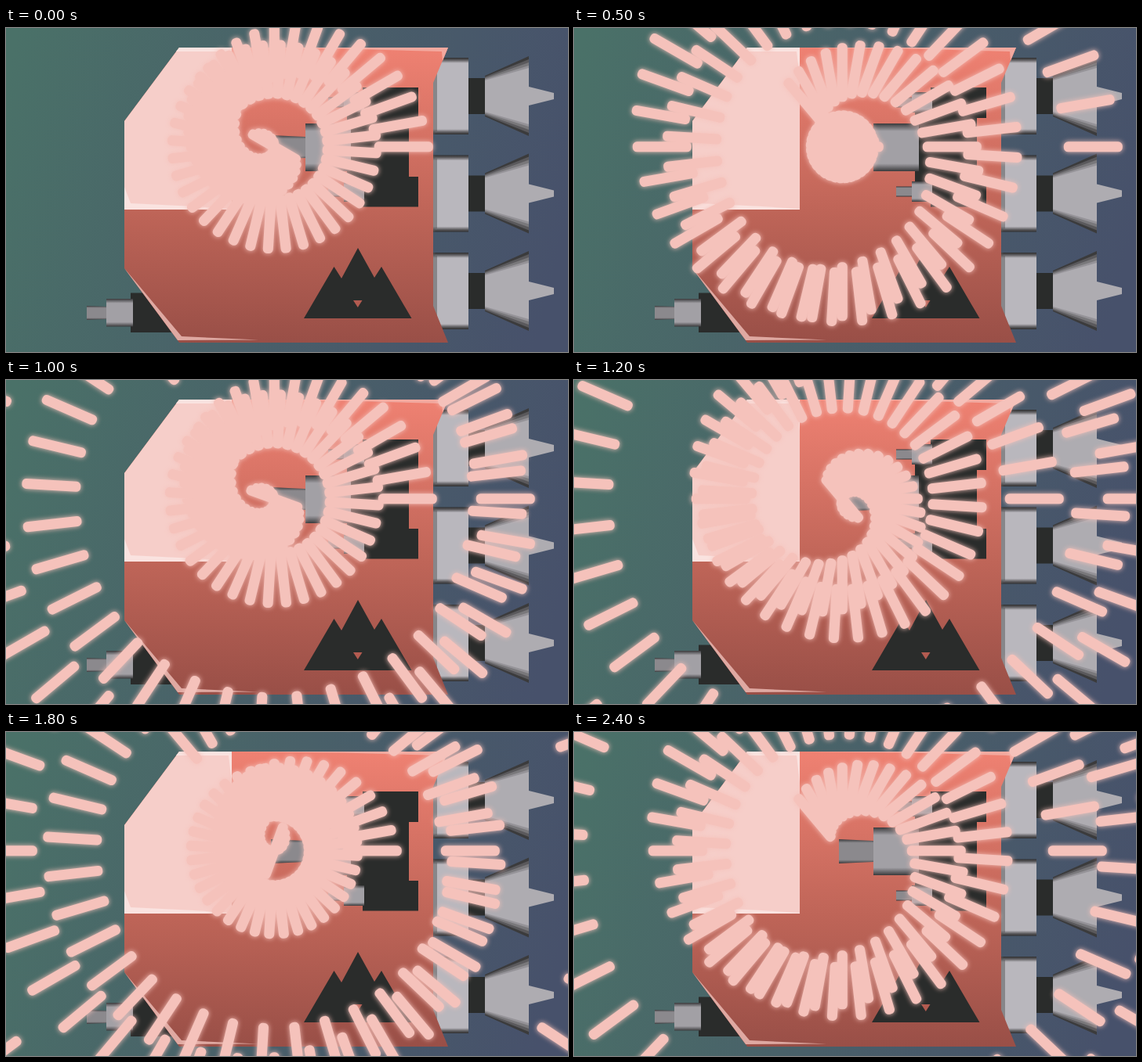
These frames come from a looping animation (717 by 414 pixels, 2.5 s). An HTML page with a canvas:

```html
<!DOCTYPE html>
<html lang="en">
<head>
<meta charset="utf-8">
<title>Spiral and ring bursts</title>
<style>
html, body { margin: 0; width: 717px; height: 414px; overflow: hidden; }
svg, canvas { position: absolute; left: 0; top: 0; display: block; }
</style>
</head>
<body>
<svg width="717" height="414" viewBox="0 0 717 414">
  <defs>
    <linearGradient id="sky" gradientUnits="userSpaceOnUse" x1="0" y1="60" x2="717" y2="250">
      <stop offset="0" stop-color="#4a7168"/>
      <stop offset=".5" stop-color="#496069"/>
      <stop offset="1" stop-color="#47516b"/>
    </linearGradient>
    <linearGradient id="hull" x2="0" y2="1">
      <stop offset="0" stop-color="#ef8172"/>
      <stop offset=".55" stop-color="#bf6558"/>
      <stop offset="1" stop-color="#994f47"/>
    </linearGradient>
    <linearGradient id="box" x2="0" y2="1">
      <stop offset="0" stop-color="#2e2e2f"/>
      <stop offset=".03" stop-color="#5c5b5e"/>
      <stop offset=".07" stop-color="#b9b7bd"/>
      <stop offset=".93" stop-color="#b9b7bd"/>
      <stop offset=".97" stop-color="#5c5b5e"/>
      <stop offset="1" stop-color="#2e2e2f"/>
    </linearGradient>
    <linearGradient id="steel" x2="0" y2="1">
      <stop offset="0" stop-color="#3a3a3c"/>
      <stop offset=".16" stop-color="#a2a0a5"/>
      <stop offset=".84" stop-color="#a2a0a5"/>
      <stop offset="1" stop-color="#3a3a3c"/>
    </linearGradient>
    <linearGradient id="barrel" x2="0" y2="1">
      <stop offset="0" stop-color="#39393b"/>
      <stop offset=".15" stop-color="#8b898d"/>
      <stop offset=".85" stop-color="#8b898d"/>
      <stop offset="1" stop-color="#39393b"/>
    </linearGradient>
    <g id="engine">
      <path fill="url(#box)" d="M545-49h45v98h-45z"/>
      <path fill="#555" opacity=".5" d="M545-49h2.500v98h-2.500zM547-45h3v90h-3z"/>
      <path fill="#2a2c2b" d="M590-23h21v46h-21z"/>
      <path fill="#3b3b3c" d="M611-26L667-51V51L611 26z"/>
      <path fill="#5a595c" d="M611-24.500L667-47V47L611 24.500z"/>
      <path fill="#79787b" d="M611-23L667-43V43L611 23z"/>
      <path fill="#959398" d="M611-21.500L667-39V39L611 21.500z"/>
      <path fill="#aeacb1" d="M611-20L667-36V36L611 20zM667-12L699-4V4L667 12z"/>
    </g>
    <g id="gun">
      <path fill="url(#steel)" d="M431-13h26v26h-26z"/>
      <path fill="url(#barrel)" d="M411-6.500h20v13h-20z"/>
    </g>
  </defs>
  <rect width="717" height="414" fill="url(#sky)"/>
  <use href="#engine" y="87"/>
  <use href="#engine" y="211.500"/>
  <use href="#engine" y="336"/>

  <path fill="#2a2c2b" d="M159 338.500h60V389h-60z"/>
  <path fill="url(#steel)" d="M128 346h34v35.500h-34z"/>
  <path fill="url(#barrel)" d="M103 355L128 356V372L103 373z"/>

  <path fill="url(#hull)" d="M221 25H564L545 70V355L564 402H221L151 307V119z"/>
  <path fill="#f3a99f" d="M288 25H564L557 42L556 30L430 26.500z"/>
  <path fill="#dfa9a2" d="M151 307L224 394L322 398.500L219 399z"/>
  <path fill="#f6cec9" d="M221 25H288V232H151V119z"/>
  <path fill="#fae3e0" d="M221 25H288V65L284 30L217 30zM151 203L159 224L240 228L288 231V232H151z"/>

  <path fill="#2a2c2b" d="M455 76H526V115H514V190H526V228.500H455V196H435V108H455z"/>
  <path fill="url(#steel)" d="M382 122h58v61h-58z"/>
  <path fill="url(#barrel)" d="M338 137L382 139V166L338 168z"/>
  <use href="#gun" y="95"/>
  <use href="#gun" y="209"/>
  <path fill="#2a2c2b" d="M380 371L418.500 305L428 320L449 281L470 319L479 305L517.500 371z"/>
  <path fill="#b35b50" d="M443 348H454.500L448.800 357z"/>
</svg>
<canvas id="stage" width="717" height="414"></canvas>
<script>
const ctx = document.getElementById('stage').getContext('2d');
const CX = 342.3, CY = 151.8, LENGTH = 75, WIDTH = 13;
const FRAME = 100, WAVE = 61, SHOTS = 50, RING = 36;
// Game ticks elapsed at each displayed step; the pace is uneven.
const TICKS = [0, 5, 15, 21, 26, 31, 36, 46, 51, 57, 62, 67, 77,
  82, 87, 93, 98, 109, 114, 119, 124, 129, 139, 144, 149];
const WARMUP = 33;

function addBullet(degrees, distance) {
  const a = -degrees * Math.PI / 180, c = Math.cos(a), s = Math.sin(a);
  ctx.setTransform(c, s, -s, c, CX, CY);
  ctx.roundRect(distance - LENGTH / 2, -WIDTH / 2, LENGTH, WIDTH, 5.5);
}

function draw(tick) {
  ctx.resetTransform();
  ctx.clearRect(0, 0, 717, 414);
  ctx.beginPath();
  // Each wave fires one full ring at once and a turning stream of single shots.
  for (let age = tick; age >= 0; age -= WAVE) {
    for (let i = 0; i < RING; i++) addBullet(6.5 + i * 10, age * 3);
    for (let i = 0; i < SHOTS && i <= age; i++) addBullet(i * 10, (age - i) * 5);
  }
  ctx.resetTransform();
  ctx.fillStyle = '#f5c2bb';
  ctx.shadowColor = '#f5c2bb';
  ctx.shadowBlur = 6;
  ctx.fill();
}

const start = performance.now();
let shown = -1;
function play() {
  const step = Math.floor((performance.now() - start) / FRAME) % TICKS.length;
  if (step !== shown) draw(WARMUP + TICKS[shown = step]);
  requestAnimationFrame(play);
}
play();
</script>
</body>
</html>
```
